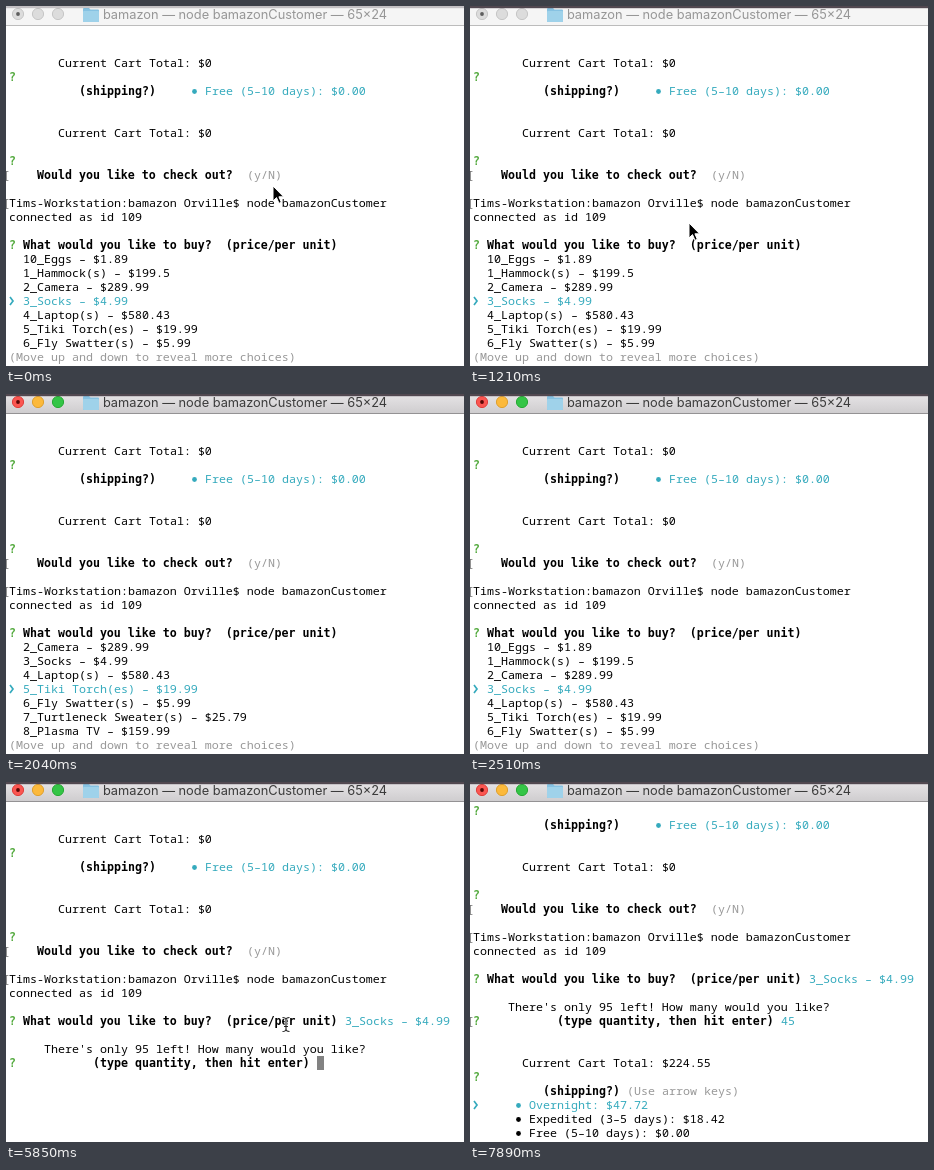
Write an HTML page that moves like this. It is 458 by 360 pixels and loops after 8000 ms.

```html
<!DOCTYPE html>
<html lang="en">
<head>
<meta charset="utf-8">
<title>Terminal session</title>
<style>
  html, body { margin: 0; width: 100%; height: 100%; overflow: hidden; background: #fff; }
  svg { display: block; }
  text { white-space: pre; }
  #screen text { font: 11.667px "Noto Sans Mono", "DejaVu Sans Mono", monospace; fill: #000; }
  #screen .bold { font: 700 11.627px "DejaVu Sans Mono", monospace; }
  #screen .cyan { fill: #35aabd; font-weight: 500; }
  #screen .green { fill: #58ac43; font: 700 11.627px "DejaVu Sans Mono", monospace; }
  #screen .gray { fill: #989898; }
  #screen .mark { fill: #777; }
  .pick { fill: none; stroke: #35aabd; stroke-width: 1.7; }
  #title { font: 12.8px Inter, "Open Sans", sans-serif; text-anchor: middle; }
</style>
</head>
<body>
<svg width="458" height="360" viewBox="0 0 458 360">
  <defs>
    <linearGradient id="chrome" x2="0" y2="1">
      <stop offset="0" stop-color="#e6e4e6"/>
      <stop offset="1" stop-color="#cfcdcf"/>
    </linearGradient>
  </defs>
  <rect width="458" height="360" fill="#fff"/>
  <g id="screen"></g>
  <rect id="bar" width="458" height="19"/>
  <rect id="edge" y="19" width="458" height="1"/>
  <g id="lights">
    <circle cx="12" cy="8" r="5.6"/>
    <circle cx="32" cy="8" r="5.6"/>
    <circle cx="52" cy="8" r="5.6"/>
  </g>
  <circle id="dot" cx="12" cy="8" r="1.9"/>
  <path fill="#86c2e2" d="M77 3q0-1 1-1h5l1.5 1.5H92q1 0 1 1V15q0 1-1 1H78q-1 0-1-1z"/>
  <rect x="77" y="5" width="16" height="11" rx="1" fill="#9fd2ea"/>
  <text id="title" x="239" y="13">bamazon — node bamazonCustomer — 65×24</text>
  <rect id="strip" width="458" height="2.2" fill="#514850"/>
  <path id="arrow" fill="#000" stroke="#fff" stroke-width="1"
    d="M0 0V15L3.5 11.6L6 17.3L8.3 16.3L5.9 10.8H10.6Z"/>
  <g id="beam" transform="translate(280 242.5)" fill="none">
    <path stroke="#fff" stroke-width="2.6" d="M-3.5-7Q0-7 0-4.5Q0-7 3.5-7M0-5V5M-3.5 7Q0 7 0 4.5Q0 7 3.5 7M-2 2H2"/>
    <path stroke="#222" stroke-width="1.1" d="M-3.5-7Q0-7 0-4.5Q0-7 3.5-7M0-5V5M-3.5 7Q0 7 0 4.5Q0 7 3.5 7M-2 2H2"/>
  </g>
</svg>
<script>
const LOOP = 8000, CELL = 7, LINE = 14, LEFT = 3, BASE = 61;
const el = id => document.getElementById(id);
const x = col => LEFT + col * CELL;
const y = row => BASE + row * LINE;

const put = (row, col, str, style = "") =>
  `<text x="${x(col)}" y="${y(row)}" class="${style}">${str}</text>`;
const ask = row => put(row, 0, "?", "green");
const mark = row => `<text x="-3" y="${y(row)}" class="mark">[</text>`;
const bullet = (row, col, color) =>
  `<circle cx="${x(col) + 3.5}" cy="${y(row) - 3.5}" r="2.4" fill="${color}"/>`;
const pointer = row => `<path class="pick" d="M${x(0) + 1} ${y(row) - 8}l3 4l-3 4"/>`;
const block = col => `<rect x="${x(col)}" y="${y(16) - 11}" width="7" height="14" fill="#828282"/>`;

const items = [
  "10_Eggs – $1.89", "1_Hammock(s) – $199.5", "2_Camera – $289.99",
  "3_Socks – $4.99", "4_Laptop(s) – $580.43", "5_Tiki Torch(es) – $19.99",
  "6_Fly Swatter(s) – $5.99", "7_Turtleneck Sweater(s) – $25.79", "8_Plasma TV – $159.99"
];

const history =
  put(0, 7, "Current Cart Total: $0") +
  ask(1) + put(2, 10, "(shipping?)", "bold") +
  bullet(2, 26, "#35aabd") + put(2, 28, "Free (5–10 days): $0.00", "cyan") +
  put(5, 7, "Current Cart Total: $0") +
  ask(7) + mark(8) + put(8, 4, "Would you like to check out?", "bold") +
  put(8, 34, "(y/N)", "gray") +
  mark(10) + put(10, 0, "Tims-Workstation:bamazon Orville$ node bamazonCustomer") +
  put(11, 0, "connected as id 109") +
  ask(13) + put(13, 2, "What would you like to buy?  (price/per unit)", "bold");

// The picked item always sits in the middle of seven rows.
const menu = pick => history + pointer(17) +
  items.slice(pick - 3, pick + 4)
    .map((item, i) => put(14 + i, 2, item, i === 3 ? "cyan" : "")).join("") +
  put(21, 0, "(Move up and down to reveal more choices)", "gray");

const quantity = history + put(13, 48, items[3], "cyan") +
  put(15, 5, "There's only 95 left! How many would you like?") +
  ask(16) + put(16, 12, "(type quantity, then hit enter)", "bold");

const typed = str => quantity + put(16, 44, str) + block(44 + str.length);

const shipping = `<g transform="translate(0 ${-3 * LINE})">` +
  quantity + mark(16) + put(16, 44, "45", "cyan") +
  put(19, 7, "Current Cart Total: $224.55") +
  ask(20) + put(21, 10, "(shipping?)", "bold") + put(21, 22, "(Use arrow keys)", "gray") +
  pointer(22) +
  ["Overnight: $47.72", "Expedited (3–5 days): $18.42", "Free (5–10 days): $0.00"]
    .map((s, i) => bullet(22 + i, 6, i ? "#000" : "#35aabd") + put(22 + i, 8, s, i ? "" : "cyan"))
    .join("") + "</g>";

const scenes = [
  [0, menu(3)], [1490, menu(4)], [1580, menu(5)], [2320, menu(4)], [2510, menu(3)],
  [3530, typed("")], [6410, typed("4")], [6600, typed("45")],
  [7150, typed("45") + mark(16)], [7430, shipping]
];
const fade = [[0, .3], [90, .4], [190, .5], [280, .6], [460, .75], [560, .9], [650, 1]];
const path = [
  [0, [267, 180]], [840, [262, 184]], [930, [251, 193]], [1020, [238, 203]],
  [1120, [226, 212]], [1210, [219, 217]]
];
const at = (steps, t) => steps.findLast(s => s[0] <= t)[1];

function setChrome(active) {
  el("bar").setAttribute("fill", active ? "url(#chrome)" : "#f5f5f5");
  el("edge").setAttribute("fill", active ? "#949294" : "#bcbcbc");
  el("title").setAttribute("fill", active ? "#3b3b3b" : "#969696");
  el("dot").setAttribute("fill", active ? "#5a0705" : "#5e5e5e");
  const fills = active ? ["#fb5651", "#fcb93b", "#34c546"] : Array(3).fill("#dcdcdc");
  const rims = active ? ["#df3f3b", "#dfa02e", "#27a934"] : Array(3).fill("#c6c6c6");
  [...el("lights").children].forEach((c, i) => {
    c.setAttribute("fill", fills[i]);
    c.setAttribute("stroke", rims[i]);
  });
}

let shown, wasActive;
function draw(now) {
  const t = now % LOOP;
  const scene = at(scenes, t), active = t >= 1300;
  if (scene !== shown) el("screen").innerHTML = shown = scene;
  if (active !== wasActive) setChrome(wasActive = active);
  el("strip").setAttribute("opacity", at(fade, t));
  el("arrow").setAttribute("transform", `translate(${at(path, t)})`);
  el("arrow").style.display = t < 1490 ? "" : "none";
  el("beam").style.display = t >= 4550 && t < 6410 ? "" : "none";
}

const start = performance.now();
function tick() {
  draw(performance.now() - start);
  requestAnimationFrame(tick);
}
tick();
</script>
</body>
</html>
```
